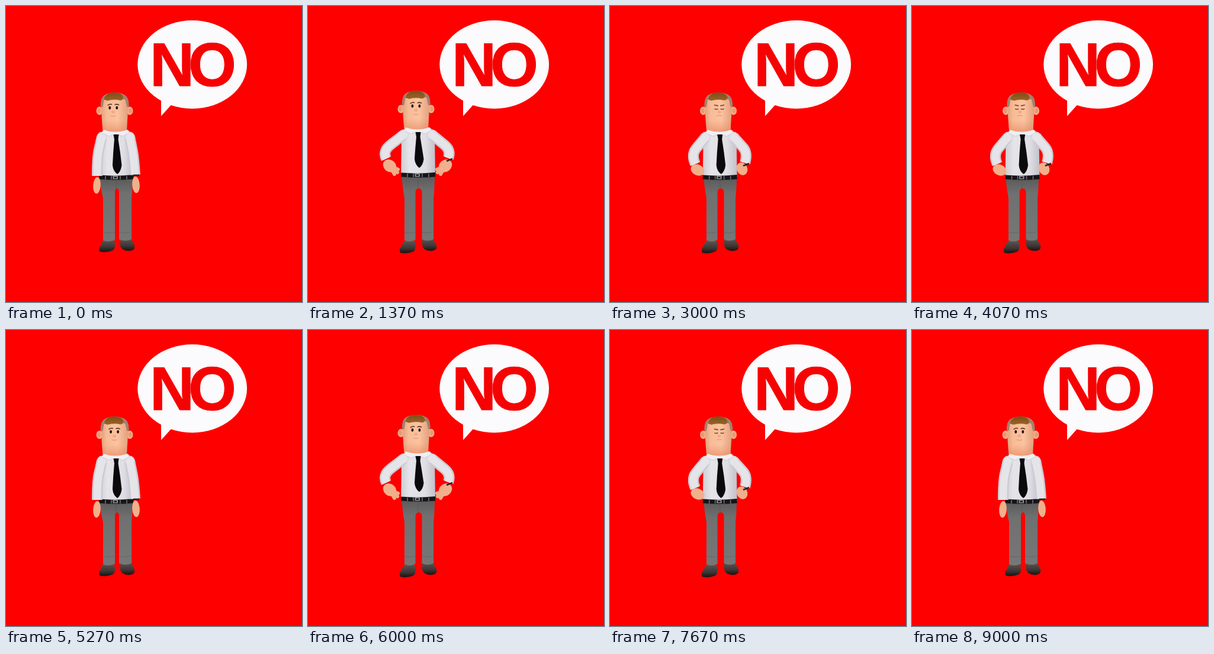
Write an HTML page that moves like this. It is 500 px wide and 500 px high and loops after 9.16 s.

```html
<!DOCTYPE html>
<html lang="en">
<head>
<meta charset="utf-8">
<title>No</title>
<style>
html, body { margin: 0; width: 100%; height: 100%; overflow: hidden; background: #fe0000; }
svg { display: block; width: 100vw; height: 100vh; }
text { font: bold 104px "Liberation Sans", Arial, sans-serif; letter-spacing: -10px; fill: #f60202; stroke: #f60202; }
</style>
</head>
<body>
<svg viewBox="0 0 500 500">
  <defs>
    <linearGradient id="skin">
      <stop offset="0" stop-color="#e3a27e"/><stop offset=".2" stop-color="#f7bb96"/>
      <stop offset=".6" stop-color="#fbc3a0"/><stop offset="1" stop-color="#e3a07c"/>
    </linearGradient>
    <linearGradient id="neck" x2="0" y2="1">
      <stop offset=".6" stop-color="#e98b66" stop-opacity="0"/><stop offset="1" stop-color="#e58560" stop-opacity=".7"/>
    </linearGradient>
    <linearGradient id="shirt">
      <stop offset="0" stop-color="#cfced5"/><stop offset=".25" stop-color="#e5e4e9"/>
      <stop offset=".7" stop-color="#e0dfe5"/><stop offset="1" stop-color="#c2c1ca"/>
    </linearGradient>
    <linearGradient id="leg" x2="0" y2="1">
      <stop offset="0" stop-color="#5a5a5a"/><stop offset=".25" stop-color="#707070"/><stop offset="1" stop-color="#777"/>
    </linearGradient>
    <linearGradient id="shoe" x2="0" y2="1">
      <stop offset="0" stop-color="#5b5451"/><stop offset=".6" stop-color="#3c3634"/><stop offset="1" stop-color="#161313"/>
    </linearGradient>
    <linearGradient id="hair" x2="0" y2="1">
      <stop offset="0" stop-color="#7d4d1c"/><stop offset="1" stop-color="#9a6524"/>
    </linearGradient>
  </defs>
  <rect width="500" height="500" fill="#fe0000"/>
  <g fill="#fbfafc">
    <ellipse cx="314.7" cy="98.8" rx="92.4" ry="74.6"/>
    <path d="M262 150V186L280 166Z"/>
  </g>
  <text x="243" y="134.8">NO</text>
  <g id="man"></g>
</svg>
<script>
const LOOP = 9160, SECOND = 4670;
const man = document.getElementById('man');

// Per arm: elbow, wrist, hand centre, hand radii, hand tilt, finger length
const DOWN = [
  [154, 256, 154, 287, 153.5, 303, 6.3, 14, 4, 0],
  [216, 256, 218, 285, 219.5, 302, 6.3, 14, -4, 0]
];
const OUT = [
  [126, 245, 132, 258, 138, 270, 12, 10, 40, 1],
  [242, 244, 237, 257, 232, 270, 12, 10, -40, 1]
];
const HIPS = [
  [137, 251, 144, 267, 148, 277, 12, 9, 25, 0],
  [233, 248, 228, 265, 223, 275, 9, 11, -25, 0]
];

const mix = (a, b, k) => a.map((v, i) => v + (b[i] - v) * k);
const mixArms = (a, b, k) => a.map((arm, i) => mix(arm, b[i], k));
const path = (d, fill, more = '') => `<path d="${d}" fill="${fill}" ${more}/>`;
const oval = (x, y, rx, ry, fill, more = '') =>
  `<ellipse cx="${x}" cy="${y}" rx="${rx}" ry="${ry}" fill="${fill}" ${more}/>`;
const line = (d, color, width, cap = 'round') =>
  `<path d="${d}" fill="none" stroke="${color}" stroke-width="${width}" stroke-linecap="${cap}" stroke-linejoin="round"/>`;

function poseAt(t) {
  const tick = Math.floor(t / 300) * 2 + (t % 300 >= 170 ? 1 : 0);
  const local = t < SECOND ? t : t - SECOND;
  const step = tick - (t < SECOND ? 6 : 37);
  const p = { arms: DOWN, turn: -.4, cx: 183.5, headY: 0, bodyX: 0, bodyY: 0, spread: 0, shut: false };

  if (local < 900) {
    const i = Math.floor(local / 300);
    p.turn = [-.4, -.2, .2][i];
    p.headY = i === 1 ? -1.5 : 0;
    return p;
  }
  if (step >= 23) return p;

  p.spread = Math.min(1, (step + 1) / 3);
  if (step < 4) {
    const k = [.15, .5, .85, 1][step];
    p.arms = mixArms(DOWN, OUT, k);
    p.bodyY = -4 * k;
    p.headY = -3 * k;
    p.cx -= k;
    p.turn = -.4 + .7 * k;
    return p;
  }
  const k = step === 4 ? .5 : 1;
  p.arms = mixArms(OUT, HIPS, k);
  p.bodyY = -4 * (1 - k);
  p.headY = -3 * (1 - k);
  p.turn = -Math.cos((step - 7) * Math.PI * 2 / 5);
  p.cx = 183.8 - .9 * p.turn;
  p.bodyX = .3 - p.turn * .8;
  p.shut = true;
  return p;
}

function legs({ spread: s, bodyY: y }) {
  const waist = 290 + y, x = 164 - s, inner = 184 - 2.5 * s, right = 191 + 1.5 * s;
  const sx = 157 - 2.5 * s, b = 415 + 2 * s;
  return path(
      `M${sx + 7} ${b - 20}H${sx + 26}Q${sx + 29} ${b - 5} ${sx + 23} ${b - 2}Q${sx + 13} ${b + 2} ${sx + 2} ${b}` +
      `Q${sx - 2} ${b - 5} ${sx + 3} ${b - 10}Z`, 'url(#shoe)') +
    path('M193 393H212Q213 398 217 404Q219 411 212 413Q204 415 197 411Q191 406 193 398Z', 'url(#shoe)') +
    path(`M158 ${waist}H214Q214 308 212 325L212 394Q202 399 ${right} 394V316Q${right} 308 ${(inner + right) / 2} 308` +
      `Q${inner} 308 ${inner} 316V395Q173 400 ${x} 396V325Q160 308 158 ${waist}Z`, 'url(#leg)') +
    line(`M${x} 382Q174 385 ${inner} 382M${right} 382Q203 385 212 381`, '#666', 1) +
    line(`M186 ${waist + 3}V308`, '#585858', 1);
}

function torso({ bodyX: x, bodyY: y }) {
  return `<g transform="translate(${x} ${y})">` +
    path('M166 209Q160 212 158 226L157 289H215L214 226Q212 212 205 209Z', 'url(#shirt)') +
    path('M157 285.5Q186 288 215 285V292.5Q186 295 157 292.5Z', '#161417') +
    line('M168 287V293M178 287V293M193 287V293M204 287V293', '#77757a', 1.5, 'butt') +
    path('M180.5 287H189V292.5H180.5Z', '#8d8c90') +
    path('M182.5 288.5H187V291H182.5Z', '#161417') + '</g>';
}

function collar({ bodyX: x, bodyY: y }) {
  const tip = 284 + 1.6 * y, wide = tip - 15;
  return `<g transform="translate(${x} ${y})">` +
    path('M165 209Q184 216 205 209L208 215L197 220L186 216L174 220L162 215Z', '#efeef2') +
    line('M163 215L174 220L184 217M188 217L197 220L207 215', '#cfcdd5', 1) +
    path(`M181.5 217H190.5L189.5 225Q193 246 195.5 ${wide}Q194 ${tip - 4} 188 ${tip}` +
      `Q181 ${tip - 5} 180 ${wide}Q181 246 183 225Z`, '#0b090c') + '</g>';
}

function arm(a, side, { bodyX, bodyY }) {
  const [ex, ey, wx, wy, hx, hy, rx, ry, tilt, reach] = a;
  const dir = side ? -1 : 1;
  const sx = (side ? 209 : 162) + bodyX, sy = 221 + bodyY;
  const [mx, my] = mix([sx, sy], [ex, ey], .65);
  const d = `M${sx} ${sy}L${mx} ${my}Q${ex} ${ey} ${wx} ${wy}`;
  let out = '';
  if (reach > .3) {
    for (const [fx, fy] of [[14, 6], [13, 11], [8, 14]])
      out += line(`M${hx} ${hy}l${dir * fx * reach} ${fy * reach}`, '#eeae8a', 6);
  }
  out += oval(hx, hy, rx, ry, '#f1b08b', `transform="rotate(${tilt} ${hx} ${hy})"`) +
    line(d, '#cccad2', 18, 'butt') + oval(sx, sy, 8.5, 8.5, '#d9d8df') +
    line(d, '#e5e4e9', 13, 'butt') + oval(sx, sy, 6.6, 6.6, '#e5e4e9');
  if (side) {
    const slant = ex > 226 ? 4 : 0;
    out += line(`M${wx - 3} ${wy + slant + 1}L${wx + 7} ${wy + 1}`, '#2b2529', 2.8, 'butt');
  }
  return out;
}

function head({ cx, headY, turn: u, shut }) {
  const face = -1 + 3 * u;
  const eye = side => {
    const x = face + side * (shut ? 5 : 6);
    return shut
      ? line(`M${x - 2.5} 174Q${x} 175 ${x + 2.5} 174`, '#7a4b36', 1.4) +
        line(`M${x - side * 2.5} 168.5L${x + side * 3} 167.3`, '#80533c', 1.8)
      : oval(x, 172, 1.9, 2.8, '#21120d') +
        line(`M${x - 3} ${167 - side * .4}Q${x} 165.2 ${x + 3} ${166.6 + side * .4}`, '#6b432c', 1.9);
  };
  const ear = (x, side) => oval(x, 177, 5.5, 7, '#f3ad86') + oval(x + side, 177, 2.6, 4, '#e39a78');
  return `<g transform="translate(${cx} ${headY})">` +
    ear(-25.5 + (u < -.7 ? 1.5 : 0), -1) + ear(25.5, 1) +
    path('M-22.5 160Q-21 147 0 147Q21 147 23 160L22 186Q21 200 20.5 211Q0 219 -20 211Q-21 200 -22 186Z', 'url(#skin)') +
    path('M-22.5 160H23L22 186Q21 200 20.5 211Q0 219 -20 211Q-21 200 -22 186Z', 'url(#neck)') +
    path('M-23.5 171Q-25 153 -13 149Q0 143 14 149Q25 153 24 171L20.5 170L18 158Q0 154 -18 158L-20 170Z', '#a08270') +
    path(`M${-18 + u} 158Q-16 147 -2 146Q13 146 ${15 + u} 155Q14 159 10 159.5Q-2 157 -12 160Z`, 'url(#hair)') +
    eye(-1) + eye(1) +
    oval(face, 179, 3, 2.6, '#f2a98a') +
    line(`M${face - 4} 185.5Q${face} ${shut ? 184.5 : 187} ${face + 4} 185.5`, '#e08f72', 1.2) + '</g>';
}

let last = '';
function draw(t) {
  const p = poseAt(t);
  const art = legs(p) + torso(p) + p.arms.map((a, i) => arm(a, i, p)).join('') + head(p) + collar(p);
  if (art !== last) man.innerHTML = last = art;
}

const start = performance.now();
function tick(now) {
  draw(Math.max(0, now - start) % LOOP);
  requestAnimationFrame(tick);
}
draw(0);
requestAnimationFrame(tick);
</script>
</body>
</html>
```
